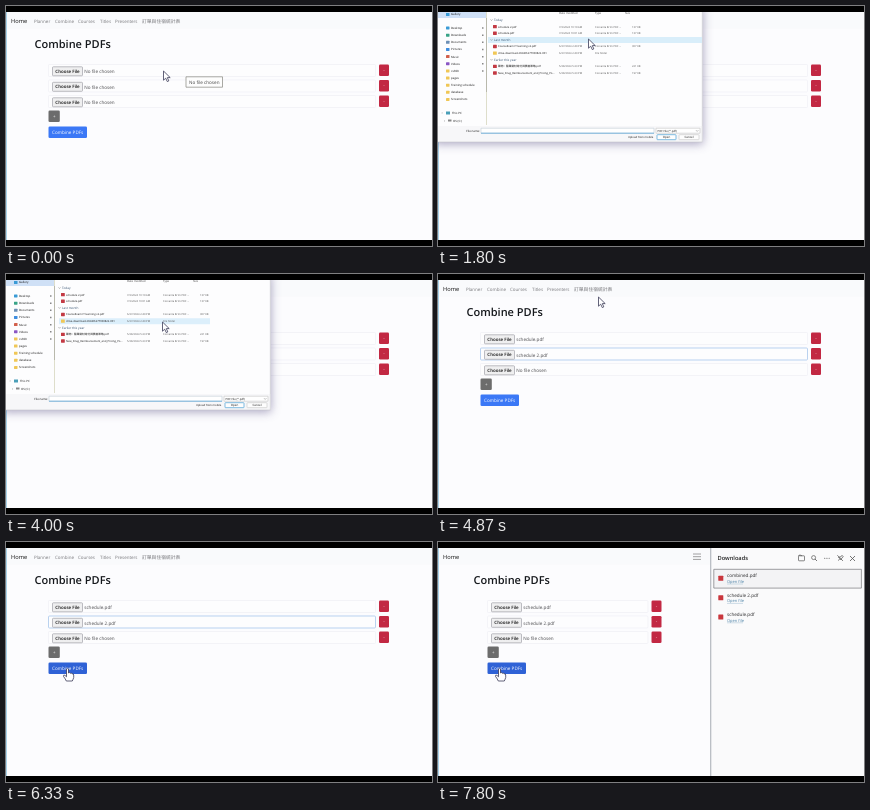
Recreate the animation shown at these times as an HTML page with a canvas. Size 426x240 px, loop 7.87 s.

```html
<!DOCTYPE html>
<html lang="en">
<head>
<meta charset="utf-8">
<title>Combine PDFs</title>
<style>
html, body { margin: 0; width: 100%; height: 100%; overflow: hidden; background: #000; }
canvas { display: block; width: 426px; height: 240px; }
</style>
</head>
<body>
<canvas id="stage" width="426" height="240"></canvas>
<script>
const g = document.getElementById('stage').getContext('2d');
const LOOP = 7870;
const FONT = '"Open Sans", "Noto Sans", "Noto Sans CJK TC", "Noto Sans CJK", sans-serif';
const PICKERS = [[1100, 2600], [3500, 4760]];
const PANEL = 7050;

// time, x, y of the pointer tip
const PATH = [
  [0, 157, 65], [950, 157, 66], [1800, 150, 33], [2150, 150, 26], [2600, 150, 26],
  [3130, 153, 77], [3500, 153, 79], [4000, 156, 48], [4400, 160, 22],
  [4870, 160, 23], [5150, 160, 23], [6050, 61, 126], [LOOP, 61, 126]
];

function text(s, x, y, size, color = '#333', weight = 400, align = 'left') {
  g.font = `${weight} ${size}px ${FONT}`;
  g.fillStyle = color;
  g.textAlign = align;
  g.fillText(s, x, y);
}

function box(x, y, w, h, fill, stroke, r = 0) {
  g.beginPath();
  g.roundRect(x, y, w, h, r);
  if (fill) { g.fillStyle = fill; g.fill(); }
  if (stroke) { g.strokeStyle = stroke; g.lineWidth = 0.7; g.stroke(); }
}

function line(color, width, ...p) {
  g.beginPath();
  for (let i = 0; i < p.length; i += 2) g.lineTo(p[i], p[i + 1]);
  g.strokeStyle = color;
  g.lineWidth = width;
  g.stroke();
}

const picking = t => PICKERS.some(([a, b]) => t >= a && t < b);

function pointerAt(t) {
  const i = PATH.findIndex(p => p[0] > t);
  const [t0, x0, y0] = PATH[i - 1], [t1, x1, y1] = PATH[i];
  const u = (t - t0) / (t1 - t0), k = u * u * (3 - 2 * u);
  return [x0 + (x1 - x0) * k, y0 + (y1 - y0) * k];
}

function page(t, hover) {
  const narrow = t >= PANEL, dx = narrow ? 7 : 0;
  const right = narrow ? 210 : 369.5;
  box(0, 6, 426, 228, '#fcfcfe');
  box(0, 6, 426, 16.5, '#f9fafc');
  line('#a9d3ea', 1, 0.5, 6, 0.5, 234);
  text('Home', 5, 15.4, 5.7, '#111', 500);
  if (narrow) {
    for (const y of [12, 14.7, 17.4]) line('#888', 0.8, 255, y, 263, y);
  } else {
    const links = [['Planner', 28], ['Combine', 49], ['Courses', 72], ['Titles', 94],
      ['Presenters', 109], ['訂單與住宿統計表', 136]];
    for (const [s, x] of links) text(s, x, 15.4, s[0] > 'z' ? 4.8 : 4.5, '#77777b');
  }
  text('Combine PDFs', 28.5 + dx, 39, 11, '#15181c', 600);

  const files = [t >= PICKERS[0][1] && 'schedule.pdf', t >= PICKERS[1][1] && 'schedule 2.pdf', ''];
  const focus = narrow || picking(t) || t < 1000 ? -1 : t < 3350 ? 0 : 1;
  files.forEach((name, i) => {
    const y = 65 + i * 15.5, x = 42.5 + dx;
    box(x, y - 6.5, right - x, 12, '#fdfdfe', i === focus ? '#9cbfe8' : '#efeff5', 1);
    box(x + 4, y - 4.2, 30, 9, '#efeff0', '#a2a2aa', 0.8);
    text('Choose File', x + 19, y + 0.8, 4.45, '#111', 600, 'center');
    text(name || 'No file chosen', x + 35.7, y + 0.8, 4.6, '#4a4a4e');
    box(right + 3.5, y - 6.5, 10, 11.5, '#c22843', null, 1.3);
    text('-', right + 8.5, y - 0.3, 4.6, '#f5dce0', 400, 'center');
  });

  box(42.5 + dx, 104.5, 11.3, 11.5, '#6c6c6c', null, 1.3);
  text('+', 48.2 + dx, 110.5, 4.6, '#eee', 400, 'center');
  box(42.5 + dx, 120.5, 38.5, 11.5, hover ? '#2f62d6' : '#3b78f6', null, 1.3);
  text('Combine PDFs', 61.7 + dx, 126.7, 4.6, '#fff', 400, 'center');
  if (t < 750) {
    box(180, 70.8, 36.5, 10.4, '#fdfdfd', '#85857d');
    text('No file chosen', 183, 76.4, 4.6, '#444');
  }
}

const FOLDERS = ['Desktop', 'Downloads', 'Documents', 'Pictures', 'Music', 'Videos', 'cs300',
  'pages', 'Training schedule', 'database', 'Screenshots'];
const FOLDER_TINTS = ['#3a9bd6', '#39a487', '#6c8fb5', '#3d8de0', '#d2604c', '#8a56c4'];

// name, date and size; a lone name is a group heading
const LISTING = [
  ['Today'],
  ['schedule 2.pdf', '7/2/2024 10:19 AM', '137 KB'],
  ['schedule.pdf', '7/2/2024 10:01 AM', '137 KB'],
  ['Last month'],
  ['CourseExam IT learning v2.pdf', '6/27/2024 2:49 PM', '307 KB'],
  ['drive-download-20240627T030822-001', '6/27/2024 2:49 PM', ''],
  ['Earlier this year'],
  ['藥物、醫藥衛材給付與價格策略.pdf', '5/28/2024 5:23 PM', '221 KB'],
  ['New_Drug_Reimbursement_and_Pricing_Po...', '5/28/2024 5:23 PM', '197 KB']
];

function picker(y0) {
  g.save();
  g.shadowColor = 'rgba(70,60,120,.45)';
  g.shadowBlur = 9;
  g.shadowOffsetY = 2;
  box(-4, 0, 268.5, 136, '#fdfdfe');
  g.restore();
  box(0, 120, 264.5, 16, '#f7f7f9');
  line('#c5c5cc', 0.6, 264.3, 6, 264.3, 136, 0, 136);

  box(0, 6, 48, 6, '#cfe0f6');
  box(8, 7, 3.5, 3, '#3a9bd6');
  text('Gallery', 13, 8.7, 2.9, '#111');
  FOLDERS.forEach((name, i) => {
    const y = 22 + i * 7.15;
    box(8, y - 1.5, 3.5, 3, FOLDER_TINTS[i] || '#f0c756', null, 0.4);
    text(name, 13, y + 0.2, 2.9, '#111');
    if (i < 7) box(44, y - 0.7, 1.5, 1.5, '#888');
  });
  text('›', 3.5, 107, 4, '#777');
  box(8, 105.5, 4, 3, '#4a9fb8');
  text('This PC', 14, 107.4, 2.9, '#111');
  text('›', 6, 114.5, 4, '#777');
  box(10, 113.5, 3.5, 2, '#888');
  text('OS (C:)', 15, 114.8, 2.9, '#111');
  line('#dedecb', 1, 48.5, 6, 48.5, 119);
  line('#b9b9ac', 1, 48.5, 12, 48.5, 86);

  [['Date modified', 121], ['Type', 157], ['Size', 187]].forEach(([s, x]) => text(s, x, 7.6, 2.8, '#444'));
  LISTING.forEach(([name, date, size], i) => {
    const y = 14 + i * 6.63, over = Math.abs(y0 - y) < 3.3;
    if (!date) {
      if (over) box(50, y - 3, 214, 6, '#d9eefa');
      line('#777', 0.5, 52.5, y - 0.6, 53.5, y + 0.5, 54.5, y - 0.6);
      text(name, 56, y + 0.2, 3.1, '#33506f');
      return;
    }
    if (over) box(53, y - 3, 151, 6, '#dceffb');
    box(55, y - 1.7, 3.8, 3.4, size ? '#c33a44' : '#f0c756', null, 0.4);
    text(name, 60, y + 0.2, 2.7, '#111');
    text(date, 121, y + 0.2, 2.65, '#555');
    text(size ? 'Corvanta Brim PDF ...' : 'File folder', 157, y + 0.2, 2.65, '#555');
    text(size, 194, y + 0.2, 2.65, '#555');
  });

  text('File name:', 42, 125.2, 2.9, '#111', 400, 'right');
  box(43, 122.2, 173, 5, '#fff', '#c8d3dc');
  line('#4a9fd4', 0.7, 43, 127.2, 216, 127.2);
  box(218, 122.2, 44, 5, '#fff', '#ccc');
  text('PDF File (*.pdf)', 219.5, 125, 2.8, '#111');
  line('#777', 0.5, 258, 124.2, 259.2, 125.4, 260.4, 124.2);
  text('Upload from mobile', 190, 131.3, 2.7, '#111');
  box(219, 128.7, 19, 5, '#fdfdfd', '#4a9fd4', 0.6);
  text('Open', 228.5, 131.3, 2.9, '#111', 400, 'center');
  box(241, 128.7, 20, 5, '#fdfdfd', '#ccc', 0.6);
  text('Cancel', 251, 131.3, 2.9, '#111', 400, 'center');
}

function downloads() {
  box(272, 6, 154, 228, '#fafafb');
  line('#b4b8bf', 1.2, 272.7, 6, 272.7, 234);
  text('Downloads', 279.5, 17, 5.7, '#222', 600);

  const ink = '#555';
  box(360.5, 13.8, 6, 5, null, ink, 0.6);
  line(ink, 0.7, 360.5, 14, 361, 13.2, 363, 13.2, 364, 14);
  g.beginPath();
  g.arc(375.6, 15.6, 2, 0, 7);
  g.stroke();
  line(ink, 0.8, 377, 17, 379, 19);
  for (const x of [386.2, 388.4, 390.6]) box(x, 15.7, 1.1, 1.1, ink, null, 0.5);
  line(ink, 0.7, 400, 18.6, 402, 16.8, 400.4, 15.2, 403, 14.8, 404, 13.3, 405.3, 14.8, 403.8, 16, 403, 18, 402, 16.8);
  line(ink, 0.7, 399.3, 13.2, 405, 19);
  line(ink, 0.8, 412, 14, 417, 19);
  line(ink, 0.8, 417, 14, 412, 19);

  box(275.8, 27.3, 147.6, 18.8, '#f3f3f5', '#77777c');
  ['combined.pdf', 'schedule 2.pdf', 'schedule.pdf'].forEach((name, i) => {
    const y = 34 + i * 19.4;
    box(280.3, y - 0.2, 5, 5, '#c9363d', null, 0.5);
    text(name, 289, y, 4.6, '#2a2a2c');
    text('Open file', 289, y + 5.8, 4, '#4d83a8');
    line('#86abc4', 0.4, 289, y + 8, 305, y + 8);
  });
}

const ARROW = new Path2D('M0 0V9.2L2.2 7.2L3.8 10.6L5.3 9.9L3.8 6.6H6.7Z');
const HAND = new Path2D('M-1 1Q0 -.7 1 1V5Q2.4 4 3 5.3Q4.3 4.6 4.8 5.9Q6 5.4 6.2 7V9.5Q5.8 11 4.8 13H-1.2Q-2 11 -4 8.4Q-4.3 6.6-2.6 7.3L-1 8.8Z');

function pointer(x, y, hand) {
  const shape = hand ? HAND : ARROW;
  g.save();
  g.translate(x + 0.5, y);
  g.fillStyle = '#fff';
  g.strokeStyle = '#3c3c58';
  g.lineWidth = 0.8;
  g.lineJoin = 'round';
  g.fill(shape);
  g.stroke(shape);
  g.restore();
}

function draw(t) {
  const [x, y] = pointerAt(t);
  const hover = x > 42 && x < 81 && y > 120 && y < 132;
  g.fillStyle = '#000';
  g.fillRect(0, 0, 426, 240);
  g.save();
  g.beginPath();
  g.rect(0, 6, 426, 228);
  g.clip();
  page(t, hover);
  if (picking(t)) picker(y);
  if (t >= PANEL) downloads();
  pointer(x, y, hover);
  g.restore();
}

g.textBaseline = 'middle';
g.textRendering = 'geometricPrecision';
const start = performance.now();
function tick() {
  draw((performance.now() - start) % LOOP);
  requestAnimationFrame(tick);
}
tick();
</script>
</body>
</html>
```
